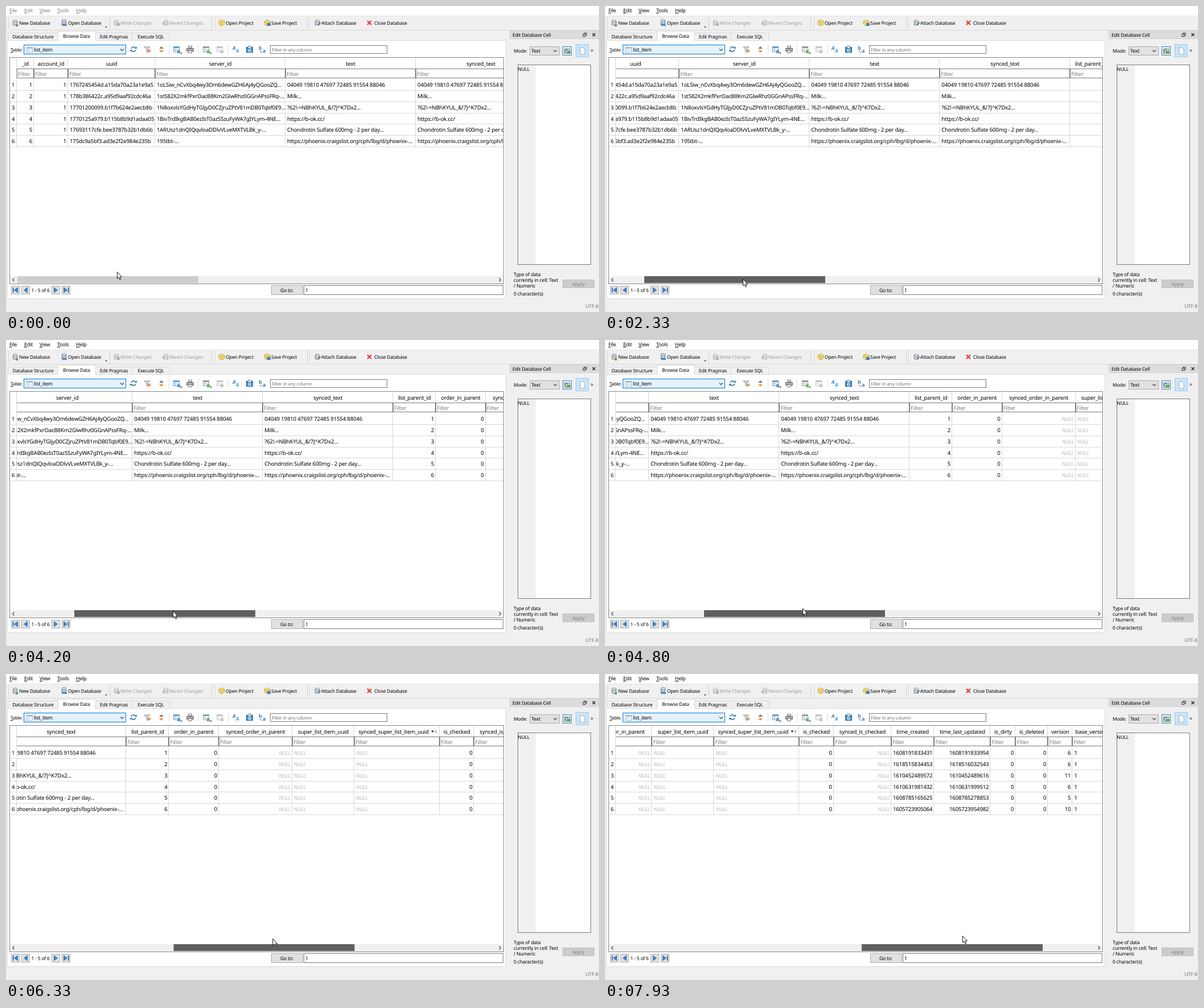
Recreate the animation shown at these times as an HTML page with a canvas. Size 1042 by 538 pixels, loop 8 s.

```html
<!DOCTYPE html>
<html lang="en">
<head>
<meta charset="utf-8">
<title>Database browser</title>
<style>
html, body { margin: 0; width: 100%; height: 100%; overflow: hidden; background: #f0f0f0; }
canvas { display: block; }
</style>
</head>
<body>
<canvas id="stage" width="1042" height="538"></canvas>
<script>
const ctx = document.getElementById('stage').getContext('2d');
const LOOP = 8000, STEP = 200 / 3, SCROLL_RATIO = 2.687;
const BLUE = '#3f80b8', DIM = '#9c9c9c', EDGE = '#7a7a7a', GRID = '#d8d8d8';

// time, thumb offset, pointer x, pointer y
const moves = [
  [0, 0, 195, 467], [67, 0, 193, 471], [200, 0, 193, 471], [267, 0, 193, 476],
  [333, 0, 193, 476], [400, 0, 193, 480], [1133, 0, 193, 480], [1667, 19.7, 213, 480],
  [2000, 34, 227, 480], [2867, 73, 266, 479], [3067, 81.5, 275, 478], [3200, 86, 279, 477],
  [3400, 86, 279, 477], [3600, 92, 285, 476], [4000, 92, 285, 476], [4200, 100, 293, 476],
  [4867, 160, 353, 471], [5400, 209, 401, 468], [5733, 209, 401, 468],
  [6733, 318, 513, 463], [7000, 318, 513, 463], [7200, 326.5, 528, 462], [7933, 431, 628, 460]
];
// time, thumb grey level
const shades = [[0, 205], [200, 205], [267, 185], [333, 185], [400, 166], [733, 166], [933, 96]];

const texts = ['04049 19810 47697 72485 91554 88046', 'Milk...', '?62!-=NBhKYUL_&!7J^K7Dx2...',
  'https://b-ok.cc/', 'Chondrotin Sulfate 600mg - 2 per day...',
  'https://phoenix.craigslist.org/cph/lbg/d/phoenix-...'];
const rows = value => Array(6).fill(value);
const count = ['1', '2', '3', '4', '5', '6'];
// name, width, alignment, values
const columns = [
  ['_id', 30, 'right', count],
  ['account_id', 60, 'right', rows('1')],
  ['uuid', 153, 'left', ['1767245454d.a15da70a23a1e9a5', '178b386422c.a95d9aaf92cdc46a',
    '17701200099.b1f7b624e2aecb8b', '1770125a979.b115b8b9d1adaa05',
    '17693117cfe.bee3787b32b1db6b', '175dc9a5bf3.ad3e2f2e984e235b']],
  ['server_id', 229, 'left', ['1oLSiw_nCvXbq4wy3Om6dewGZH6Aj4yQGooZQ...',
    '1st582X2mkfPxrOacB8Km2GlwRhz0GGnAPssFRq-...', '1N8oxvlsYGdHyTGljyD0CZjruZPtV81mDB0Tqbf0E9...',
    '1BivTrdIkgBAB0ezIsT0azSSzuFyWA7gIYLym-4NE...', '1ARUsz1dnQIQqvloaDDlvVLveMXTVLBk_y-...', '195tbt-...']],
  ['text', 229, 'left', texts],
  ['synced_text', 229, 'left', texts],
  ['list_parent_id', 75, 'right', count],
  ['order_in_parent', 87.5, 'right', rows('0')],
  ['synced_order_in_parent', 129, 'right', rows('NULL')],
  ['super_list_item_uuid', 109, 'left', rows('NULL')],
  ['synced_super_list_item_uuid', 150, 'left', rows('NULL')],
  ['is_checked', 60.5, 'right', rows('0')],
  ['synced_is_checked', 101, 'right', rows('NULL')],
  ['time_created', 75.5, 'right', ['1608191833431', '1618515834453', '1610452489572',
    '1610631981432', '1608785165625', '1605723905064']],
  ['time_last_updated', 99, 'right', ['1608191833954', '1618516032543', '1610452489616',
    '1610631999512', '1608785278853', '1605723954982']],
  ['is_dirty', 44, 'right', rows('0')],
  ['is_deleted', 57, 'right', rows('0')],
  ['version', 43, 'right', ['6', '6', '11', '6', '5', '10']],
  ['base_version', 67, 'left', rows('1')]
];

function interpolate(keys, t) {
  const next = keys.findIndex(k => k[0] > t);
  if (next < 0) return keys.at(-1).slice(1);
  const a = keys[next - 1], b = keys[next], f = (t - a[0]) / (b[0] - a[0]);
  return a.slice(1).map((v, i) => v + (b[i + 1] - v) * f);
}

function rect(x, y, w, h, fill, stroke) {
  if (fill) { ctx.fillStyle = fill; ctx.fillRect(x, y, w, h); }
  if (stroke) {
    ctx.strokeStyle = stroke; ctx.lineWidth = 1;
    ctx.strokeRect(x + .5, y + .5, w - 1, h - 1);
  }
}

function path(points, fill, stroke, width = 1) {
  ctx.beginPath();
  for (let i = 0; i < points.length; i += 2) ctx.lineTo(points[i], points[i + 1]);
  if (fill) { ctx.closePath(); ctx.fillStyle = fill; ctx.fill(); }
  if (stroke) { ctx.strokeStyle = stroke; ctx.lineWidth = width; ctx.stroke(); }
}

function arc(x, y, r, from, to, color, width) {
  ctx.beginPath(); ctx.arc(x, y, r, from, to);
  ctx.strokeStyle = color; ctx.lineWidth = width; ctx.stroke();
}

// y is the middle of the line
function text(s, x, y, color = '#000', size = 8.4, align = 'left', style = '') {
  ctx.font = `${style} ${size}px "Noto Sans", "Open Sans", sans-serif`;
  ctx.textAlign = align;
  ctx.fillStyle = color;
  ctx.fillText(s, x, y + 3.1);
}

function accessText(s, x, y, color, size) {
  text(s, x, y, color, size);
  rect(x, y + 4, ctx.measureText(s[0]).width, 1, color);
}

const cross = (x, y, r, color, w) => {
  path([x - r, y - r, x + r, y + r], null, color, w);
  path([x - r, y + r, x + r, y - r], null, color, w);
};
const chevron = (x, y, dx, dy, color = '#444') =>
  path(dx ? [x - dx, y - 3, x + dx, y, x - dx, y + 3] : [x - 3, y - dy, x, y + dy, x + 3, y - dy], null, color, 1.1);
const drop = (x, y) => path([x - 2, y, x + 2, y, x, y + 2], '#222');

function cylinder(x, y, fill, edge) {
  rect(x, y + 1, 8, 8, fill, edge);
  ctx.beginPath(); ctx.ellipse(x + 4, y + 1.5, 4, 1.6, 0, 0, 7);
  ctx.fillStyle = '#fff'; ctx.fill();
  ctx.strokeStyle = edge; ctx.stroke();
  path([x, y + 5, x + 8, y + 5], null, edge, .6);
}

function cube(x, y) {
  path([x, y + 3, x + 5, y, x + 10, y + 3, x + 10, y + 8, x + 5, y + 11, x, y + 8], '#f5dc7c', '#c09a28', .8);
  path([x, y + 3, x + 5, y + 6, x + 10, y + 3], null, '#c09a28', .8);
  path([x + 5, y + 6, x + 5, y + 11], null, '#c09a28', .8);
}

function sheet(x, y, color, badge) {
  rect(x, y, 11, 10, '#fff', color);
  rect(x, y, 11, 3, color);
  path([x, y + 6, x + 11, y + 6], null, color, .7);
  path([x + 4, y, x + 4, y + 10], null, color, .7);
  if (badge) rect(x + 7, y + 7, 5, 5, badge);
}

function drawToolbar(active) {
  rect(0, 0, 1042, 17, '#fff');
  const menu = active ? '#000' : '#808080';
  [['File', 6], ['Edit', 32], ['View', 59], ['Tools', 90], ['Help', 123]]
    .forEach(([s, x]) => accessText(s, x, 8, menu, 8.9));
  rect(0, 17, 1042, 1, '#e3e3e3');
  rect(0, 42, 1042, 1, '#dadada');
  for (const x of [4, 367, 533]) for (let y = 20; y < 40; y += 3) rect(x, y, 1, 1, '#a8a8a8');
  for (const x of [182, 361, 529]) rect(x, 19, 1, 22, '#cfcfcf');
  cylinder(12, 25, '#dfe5ea', '#6d7780');
  path([17, 32, 21, 32, 21, 36, 17, 36], '#58a846');
  cylinder(98, 24, '#dfe5ea', '#6d7780');
  path([97, 31, 105, 31, 108, 35, 99, 35], '#4c8fce');
  drop(176, 36);
  cylinder(190, 25, '#e4e4e4', '#a8a8a8');
  rect(195, 30, 5, 5, '#b4b4b4');
  cylinder(277, 25, '#e4e4e4', '#a8a8a8');
  path([274, 31, 278, 28, 278, 34], '#b0b0b0');
  cube(374, 24);
  cube(454, 24);
  rect(459, 30, 6, 5, '#3c83c4');
  cylinder(543, 25, '#dfe5ea', '#6d7780');
  path([548, 33, 553, 29], null, '#37648f', 1.6);
  cross(638.5, 29.5, 3.5, '#e03a30', 2.2);
  [['New Database', 23], ['Open Database', 109], ['Write Changes', 201, DIM], ['Revert Changes', 287, DIM],
    ['Open Project', 386], ['Save Project', 466], ['Attach Database', 554], ['Close Database', 647]]
    .forEach(([s, x, color]) => text(s, x, 30, color));
}

function drawPanel() {
  rect(2, 60, 877, 455, '#fff', '#dadada');
  [['Database Structure', 3, 89], ['Edit Pragmas', 157, 65], ['Execute SQL', 221, 67]].forEach(([s, x, w]) => {
    rect(x, 47, w, 14, '#f0f0f0', '#d9d9d9');
    text(s, x + w / 2, 53.5, '#000', 8.4, 'center');
  });
  rect(91, 44, 67, 17, '#fff', '#d9d9d9');
  rect(92, 60, 65, 1, '#fff');
  text('Browse Data', 124, 53, '#000', 8.4, 'center');

  accessText('Table:', 8, 77, '#000', 8);
  rect(31, 68, 180, 17, '#e5f1fb', '#0078d7');
  sheet(36, 72, '#9dbfdb');
  text('list_item', 49, 77, '#000', 8.9);
  chevron(204, 77, 0, 1.5);

  arc(224, 76, 4, 3.4, 5.9, BLUE, 1.8);
  arc(224, 76, 4, .3, 2.8, BLUE, 1.8);
  path([226, 75, 230, 75, 230, 71], BLUE);
  path([222, 77, 218, 77, 218, 81], BLUE);
  path([243, 72, 253, 72, 249.5, 76, 249.5, 82, 247, 80, 247, 76], '#d9dde0', '#777', .8);
  cross(252, 79, 2, '#ee7b2d', 1.6);
  path([269, 75, 273, 71, 277, 75], '#777');
  path([269, 78, 277, 78, 273, 82], '#ee9030');
  for (const x of [286, 337, 390]) rect(x, 68, 1, 17, '#dedede');
  sheet(294, 71, '#6b9cc6', '#5d93c4');
  drop(308, 82);
  rect(320, 70, 7, 4, '#fff', '#777');
  rect(317, 74, 13, 6, '#a9aeb2', '#6b6f73');
  rect(320, 78, 7, 5, '#fff', '#777');
  sheet(346, 71, '#909ca5', '#6fb35f');
  drop(360, 82);
  sheet(370, 71, '#c4c4c4', '#c4c4c4');
  text('A', 398, 74, BLUE, 9, 'left', 'bold italic');
  text('A', 404, 79, '#4ba0d8', 9, 'left', 'bold italic');
  rect(422, 72, 12, 10, '#4b8cc2', '#23659a');
  rect(425, 70, 6, 5, '#fff', '#5f88a9');
  arc(428, 78, 2, 0, 7, '#fff', 1.2);
  text('b', 444, 74, BLUE, 9, 'left', 'bold');
  text('a', 451, 79, BLUE, 9, 'left', 'bold');
  path([446, 79, 450, 82], null, '#555');
  rect(464, 69, 206, 15, '#fff', EDGE);
  text('Filter in any column', 467, 77, '#757575', 8.1);

  [9, 27, 80, 98].forEach((x, i) => {
    rect(x, 492, 15, 15, '#e1e1e1', '#adadad');
    const c = x + 7.5, dir = i < 2 ? 1 : -1, shift = i % 3 ? 0 : dir;
    path([c + shift + 3 * dir, 495, c + shift + 3 * dir, 504, c + shift - 3 * dir, 499.5], '#3a86d0', '#1d5e9f', .7);
    if (shift) rect(c - 4 * dir - .7, 495, 1.6, 9, '#1d5e9f');
  });
  text('1 - 5 of 6', 44.5, 500, '#000', 8.5);
  rect(466, 491, 56, 17, '#e1e1e1', '#adadad');
  text('Go to:', 493.5, 500, '#000', 8.6, 'center');
  rect(523, 491, 351, 17, '#fff', EDGE);
  text('1', 526, 500, '#000', 8.8);
}

function drawDock() {
  rect(885, 43, 157, 15, '#dcdcdc', '#d0d0d0');
  text('Edit Database Cell', 890, 51);
  rect(1015.5, 47, 5, 5, null, '#333');
  rect(1013.5, 49, 5, 5, '#dcdcdc', '#333');
  cross(1033, 50.5, 2.5, '#222', 1.2);
  text('Mode:', 892, 79);
  rect(920, 71, 53, 16, '#e1e1e1', '#adadad');
  text('Text', 923, 79, '#000', 8.7);
  chevron(965, 79, 0, 1.5);
  rect(978, 71, 16, 16, '#e5f1fb', '#3f7fb8');
  rect(981, 75, 10, 9, '#dfe7ea', '#68808e');
  arc(985, 79, 2.3, 0, 7, '#76817f', 1.3);
  rect(986, 79, 6, 5, '#62aa4e');
  rect(1001, 67, 23, 23, '#cce4f7', '#99cdf2');
  path([1009, 73, 1014, 73, 1017, 76, 1017, 85, 1009, 85], '#fff', '#8fa6b7', .9);
  text('»', 1027, 78, '#333', 10);
  rect(899, 103, 129, 352, '#fff', EDGE);
  rect(900, 104, 31, 350, '#f0f0f0');
  text('NULL', 899.5, 111, '#000', 8.4);
  text('Type of data', 892, 472, '#000', 8.6);
  text('currently in cell: Text', 892, 482, '#000', 8.6);
  text('/ Numeric', 892, 492, '#000', 8.6);
  text('0 character(s)', 892, 506, '#000', 8.6);
  rect(978, 481, 56, 15, '#cccccc', '#bfbfbf');
  text('Apply', 1006, 489, '#838383', 8.6, 'center');
  text('UTF-8', 1018, 528, '#777', 8.9);
}

function drawTable(offset, shade) {
  const rowLine = i => Math.round(128 + (i + 1) * 19.85);
  const rowMid = i => 139 + i * 19.8;
  rect(6, 90, 869, 399, '#fff', '#828790');
  rect(18, 91, 1, 157, GRID);
  for (let i = 0; i < 6; i++) {
    rect(7, rowLine(i), 867, 1, GRID);
    text(count[i], 12.5, rowMid(i), '#000', 9.4, 'center');
  }

  ctx.save();
  ctx.beginPath();
  ctx.rect(19, 91, 855, 384);
  ctx.clip();
  let left = 19 - offset * SCROLL_RATIO;
  for (const [name, width, align, values] of columns) {
    const right = left + width, x = Math.round(left), end = Math.round(right);
    if (right > 19 && left < 874) {
      const sorted = name === 'synced_super_list_item_uuid';
      text(name, left + width / 2 - (sorted ? 6 : 0), 102, '#000', 9.7, 'center');
      if (sorted) {
        path([right - 15, 99.5, right - 10, 99.5, right - 12.5, 103], '#222');
        text('1', right - 9, 101, '#222', 7);
      }
      rect(end - 1, 91, 1, 20, GRID);
      rect(end - 1, 127, 1, 121, GRID);
      rect(x, 110, end - x, 17, '#fff', EDGE);
      text('Filter', left + 2, 119.5, '#7d7d7d', 9.5);
      values.forEach((value, i) => {
        const isNull = value === 'NULL';
        text(value, align === 'right' ? right - 3 : left + 3, rowMid(i),
          isNull ? '#b8b8b8' : '#000', isNull ? 9.2 : 9.7, align, isNull ? 'italic' : '');
      });
    }
    left = right;
  }
  ctx.restore();

  rect(7, 475, 867, 13, '#f0f0f0');
  chevron(13, 481.5, -1.5, 0);
  chevron(868, 481.5, 1.5, 0);
  rect(20 + offset, 475, 318, 12, `rgb(${shade},${shade},${shade})`);
}

function drawPointer(x, y) {
  ctx.save();
  ctx.translate(x, y);
  path([.5, .5, .5, 12.2, 3.1, 9.8, 5, 14.4, 6.8, 13.6, 5, 9.2, 8.5, 9.2], '#fff', '#000', .9);
  ctx.restore();
}

function draw() {
  const now = performance.now() % LOOP;
  const t = Math.floor((now + 4) / STEP) * STEP % LOOP;
  const [offset, x, y] = interpolate(moves, t + .4);
  const [shade] = interpolate(shades, t + .4);
  rect(0, 0, 1042, 538, '#f0f0f0');
  drawToolbar(t > 790);
  drawPanel();
  drawDock();
  drawTable(offset, Math.round(shade));
  drawPointer(x, y);
  requestAnimationFrame(draw);
}

ctx.letterSpacing = '-0.2px';
ctx.textRendering = 'geometricPrecision';
draw();
</script>
</body>
</html>
```
